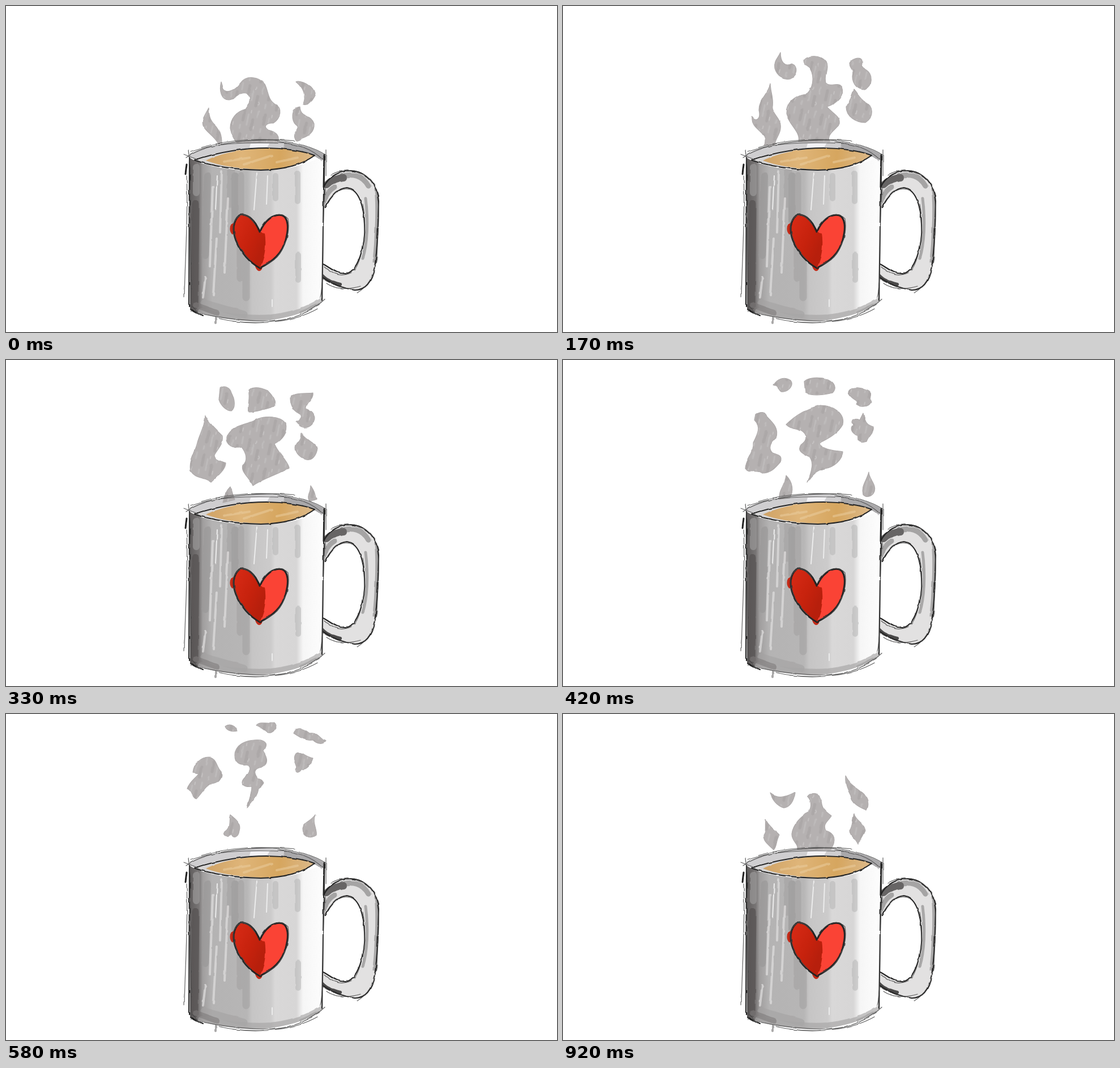
Write an HTML page without scripts that moves like this. It is 973x576 px and loops after 1 s.

```html
<!DOCTYPE html>
<html lang="en">
<head>
<meta charset="utf-8">
<title>Steaming mug</title>
<style>
html, body { margin: 0; width: 100%; height: 100%; overflow: hidden; background: #fff; }
svg { display: block; width: 100%; height: 100%; }
path { stroke-linecap: round; stroke-linejoin: round; }

/* Steam poses: each is shown for one slot of the loop */
.pose { opacity: 0; animation: slot 1s step-end infinite; animation-delay: calc((var(--t) - 1000) * 1ms); }
.pose.long { animation-name: slot-long; }
@keyframes slot { 0% { opacity: 1 } 7.99%, 100% { opacity: 0 } }
@keyframes slot-long { 0% { opacity: 1 } 8.99%, 100% { opacity: 0 } }
.puff path { transform-box: fill-box; transform-origin: center; transform: var(--shrink, none); }
.steam { fill: url(#brush); stroke: #aeaaaa; stroke-width: 1.2; }
.thin { --shrink: translateY(-10px) scale(.75); }
.fade { --shrink: translateY(-13px) scale(.5); }

.line { fill: none; stroke: #242424; stroke-width: 2.1; }
.bold { stroke-width: 3; }
.fine { fill: none; stroke: #484848; stroke-width: 1.2; opacity: .85; }
.stroke { fill: none; }
</style>
</head>
<body>
<svg viewBox="0 0 973 576" preserveAspectRatio="none">
<defs>
  <filter id="rough" x="-5%" y="-5%" width="110%" height="110%" color-interpolation-filters="sRGB">
    <feTurbulence type="fractalNoise" baseFrequency=".05" numOctaves="2" seed="4"/>
    <feDisplacementMap in="SourceGraphic" scale="3" xChannelSelector="R" yChannelSelector="G"/>
  </filter>
  <pattern id="brush" width="37" height="43" patternUnits="userSpaceOnUse" patternTransform="rotate(12)">
    <path fill="#b5b1b1" d="M0 0H37V43H0Z"/>
    <path class="stroke" stroke="#aca8a8" stroke-width="5" d="M7 6V24M24 20V38"/>
    <path class="stroke" stroke="#bebbbb" stroke-width="3" d="M15 12V31M31 3V14M4 33V39"/>
    <path class="stroke" stroke="#d4d2d2" stroke-width="1" d="M19 5V10M28 30V36"/>
  </pattern>
  <linearGradient id="body" gradientUnits="userSpaceOnUse" x1="324" x2="560" y1="0" y2="0">
    <stop stop-color="#605d5d"/><stop offset=".07" stop-color="#787575"/>
    <stop offset=".1" stop-color="#a09e9e"/><stop offset=".17" stop-color="#b4b3b3"/>
    <stop offset=".43" stop-color="#b7b6b6"/><stop offset=".47" stop-color="#c6c5c5"/>
    <stop offset=".61" stop-color="#cccbcb"/><stop offset=".64" stop-color="#d9d8d8"/>
    <stop offset=".8" stop-color="#d7d6d6"/><stop offset=".85" stop-color="#f6f6f6"/>
    <stop offset="1" stop-color="#fdfdfd"/>
  </linearGradient>
  <linearGradient id="coffee" gradientUnits="userSpaceOnUse" x1="350" x2="540" y1="265" y2="275">
    <stop stop-color="#cfa265"/><stop offset=".35" stop-color="#dfb579"/>
    <stop offset=".7" stop-color="#d6a65f"/><stop offset="1" stop-color="#dcb887"/>
  </linearGradient>
  <linearGradient id="red" gradientUnits="userSpaceOnUse" x1="400" x2="458" y1="390" y2="415">
    <stop stop-color="#d62a15"/><stop offset=".6" stop-color="#c6220d"/><stop offset="1" stop-color="#b71f0c"/>
  </linearGradient>
  <clipPath id="cup"><path d="M324 268C350 284 400 291 450 291C500 290 540 278 561 262L558 522C530 545 480 556 440 557C400 556 350 548 325 536Z"/></clipPath>

  <g id="curls" class="puff">
    <path d="M358 180C352 192 345 200 348 211C352 222 366 228 375 243L381 243C381 228 378 220 370 211C361 203 358 195 358 180Z"/>
    <path d="M380 134C376 150 380 166 394 166C408 164 412 151 424 154C437 160 431 172 424 182C406 186 396 200 396 216C398 226 402 236 408 242L478 242C486 232 478 222 463 219C452 212 462 206 472 207C486 198 488 180 476 174C462 166 464 152 457 138C446 124 424 122 414 136C406 148 392 156 384 147Z"/>
    <path d="M512 134C520 130 545 140 546 158C540 170 532 176 524 174C532 160 524 144 512 134Z"/>
    <path d="M519 178C502 180 504 204 512 210C522 212 506 222 510 232C512 240 518 240 522 234C534 230 545 222 544 208C538 190 520 198 519 178Z"/>
  </g>
  <g id="flames" class="puff">
    <path d="M366 138C362 156 346 164 346 184C350 200 340 206 334 196C332 212 346 218 352 226C360 234 356 242 356 246L374 246C374 234 386 226 384 210C384 198 368 190 370 176C372 162 366 150 366 138Z"/>
    <path d="M384 82C380 92 372 96 374 110C378 124 390 130 400 128C414 124 416 106 404 102C392 108 384 100 384 82Z"/>
    <path d="M424 96C432 86 456 86 464 98C470 110 460 122 464 136C472 144 484 134 492 142C498 156 486 172 466 178C476 190 490 194 488 208C482 220 466 224 470 240L416 240C420 222 400 212 394 190C394 170 410 158 430 156C440 146 446 128 436 110C430 104 424 104 424 96Z"/>
    <path d="M506 102C510 94 524 88 528 96C530 106 522 106 534 112C548 120 548 140 532 148C518 148 508 134 512 118C510 110 506 110 506 102Z"/>
    <path d="M514 148C520 154 524 164 534 170C548 176 550 196 534 206C518 206 500 196 500 178C508 170 508 160 514 148Z"/>
  </g>
  <g id="clouds" class="puff">
    <path d="M378 50C384 44 396 48 398 58C404 70 406 84 398 90C390 90 380 82 376 70Z"/>
    <path d="M428 54C436 46 448 48 462 54C470 62 480 76 474 82C460 86 442 92 428 92C426 78 432 66 428 54Z"/>
    <path d="M502 68C506 56 530 60 542 58C544 70 528 76 530 86C544 90 550 102 540 114C530 124 518 118 512 110C522 104 526 98 514 92C506 86 502 78 502 68Z"/>
    <path d="M512 150C520 144 522 136 522 128C526 140 544 144 550 156C548 170 540 178 530 176C518 172 508 162 512 150Z"/>
    <path d="M352 98C350 120 342 130 338 146C334 164 322 178 326 196C334 210 350 206 362 216C372 206 388 194 388 182C380 178 368 178 368 168C374 156 384 150 382 134C372 124 360 114 352 98Z"/>
    <path d="M390 136C396 116 420 116 440 106C456 98 484 98 494 112C498 128 486 142 474 148C480 164 496 176 500 190C482 202 456 208 436 222C430 208 414 198 418 186C428 178 424 164 416 154C404 158 388 150 390 136Z"/>
  </g>
  <g id="nubs" class="puff">
    <path d="M396 224C386 234 386 242 383 252L404 247C400 238 400 232 396 224Z"/>
    <path d="M538 222C538 234 530 240 536 250L548 246C544 236 548 236 538 222Z"/>
  </g>
  <g id="islands" class="puff">
    <path d="M372 44C378 34 390 28 402 36C408 44 400 54 390 56C380 58 384 48 372 44Z"/>
    <path d="M426 38C434 30 452 30 468 34C480 40 484 50 476 58C460 62 440 64 428 58Z"/>
    <path d="M504 58C504 48 520 48 538 54C550 60 538 66 544 74C540 84 526 84 518 78C524 70 510 72 504 58Z"/>
    <path d="M530 94C534 108 534 114 548 118C550 128 540 132 536 144C524 148 518 142 522 134C510 130 506 122 512 116C506 106 516 102 524 106Z"/>
    <path d="M340 96C348 90 358 92 360 100C372 112 382 122 376 138C366 146 362 156 370 164C380 168 388 168 384 180C374 192 366 200 352 200C340 192 330 202 322 192C322 176 338 164 336 146C344 130 350 118 338 106Z"/>
    <path d="M394 114C410 98 430 86 454 80C480 80 498 96 494 114C486 130 466 140 454 146C456 158 476 160 494 162C494 176 478 190 462 192C446 196 438 206 432 216C438 198 444 184 436 172C420 164 414 160 420 150C434 140 430 130 420 124C410 122 402 122 394 114Z"/>
    <path d="M394 204C406 216 408 232 400 244L382 246C380 230 392 222 394 204Z"/>
    <path d="M540 198C540 210 554 220 550 232C546 242 536 244 530 238C526 222 536 214 540 198Z"/>
  </g>
  <g id="shreds" class="puff">
    <path d="M387 22C394 16 406 20 408 30C400 32 390 30 387 22Z"/>
    <path d="M442 20C448 12 464 18 474 16C480 20 476 28 468 32C458 34 454 24 442 20Z"/>
    <path d="M508 34C512 22 524 24 536 34C552 32 552 42 564 48C560 54 550 54 542 46C530 48 520 42 508 34Z"/>
    <path d="M512 70C522 64 528 76 542 78C538 90 532 98 522 98C516 106 508 104 514 94C512 86 506 78 512 70Z"/>
    <path d="M330 104C332 88 344 76 358 76C374 80 370 92 380 102C384 114 374 124 360 124C350 130 346 140 336 150C328 148 330 136 320 132C324 120 332 116 340 106Z"/>
    <path d="M404 74C404 54 424 44 450 46C464 50 460 58 454 66C462 78 464 88 452 94C436 96 438 106 444 114C460 116 456 126 446 132C444 146 436 152 426 166C428 152 434 144 434 128C422 130 410 124 422 112C428 102 434 96 426 90C412 92 404 86 404 74Z"/>
    <path d="M396 178C406 186 416 194 412 206C410 220 400 220 398 212C394 218 380 216 386 208C398 200 392 190 396 178Z"/>
    <path d="M546 178C540 192 550 204 548 214C536 222 524 216 524 202C526 190 538 190 546 178Z"/>
  </g>
  <g id="wisps" class="puff">
    <path d="M435 18L437 18 438 36C448 44 442 52 440 54C450 62 446 80 440 92C438 104 436 108 430 108C424 96 438 84 438 68C436 54 428 54 424 48C432 42 434 34 435 18Z"/>
    <path d="M346 70C352 64 360 56 370 58C374 66 364 72 360 80C350 84 344 80 346 70Z"/>
    <path d="M516 44L523 42C522 52 532 58 530 66C530 72 526 76 524 80C524 68 518 56 516 44Z"/>
  </g>
  <g id="buds" class="puff">
    <path d="M382 182C390 176 390 168 400 164C412 164 408 172 408 180C414 190 404 196 396 194C388 194 386 188 382 182Z"/>
    <path d="M514 146C524 152 526 152 530 142C538 150 540 158 538 168C536 176 540 186 534 192C526 184 526 178 532 168C534 160 524 154 514 146Z"/>
    <path d="M366 222C376 228 380 236 378 250L366 258C364 246 368 236 366 222Z"/>
    <path d="M408 222C416 220 422 212 428 208C438 222 452 228 464 230C462 242 462 246 456 251L414 253C416 240 410 232 408 222Z"/>
    <path d="M520 218C522 230 526 238 524 248L506 250C508 236 516 234 520 218Z"/>
  </g>
  <g id="loose" class="puff">
    <path d="M366 140C378 150 392 148 410 138C408 152 402 164 390 166C378 162 370 152 366 140Z"/>
    <path d="M499 110C506 126 520 130 532 142C540 152 540 162 536 170C522 164 510 158 508 144C502 132 498 124 499 110Z"/>
  </g>
  <g id="rising" class="puff">
    <path d="M358 186C362 198 374 204 382 214C376 224 378 234 372 240C362 230 354 226 354 214C360 206 356 198 358 186Z"/>
    <path d="M432 146C440 138 452 138 456 150C456 168 464 172 474 180C468 190 458 194 464 206C480 210 484 224 472 240L414 240C416 228 404 226 404 212C406 196 420 180 434 174C440 162 438 152 432 146Z"/>
    <path d="M514 176C516 188 532 192 534 206C530 216 526 222 520 230C516 220 506 214 506 206C512 198 510 190 514 176Z"/>
  </g>
</defs>

<!-- Handle -->
<g filter="url(#rough)">
  <path fill="#e2e1e1" fill-rule="evenodd" d="M560 318C572 298 590 290 612 291C640 292 658 316 658 345L653 440C650 478 640 502 618 502C596 500 576 494 558 483L560 457C574 464 586 474 600 473C620 470 632 440 634 405C634 370 630 322 602 321C584 322 570 338 563 356Z"/>
  <path class="stroke" stroke="#a5a4a4" stroke-width="9" d="M559 354C562 338 570 326 580 320M592 301C612 295 630 300 640 318"/>
  <path class="stroke" stroke="#676565" stroke-width="12" d="M566 316C574 308 584 304 596 303"/>
  <path class="stroke" stroke="#a9a8a8" stroke-width="5" d="M653 325C657 360 653 420 650 452M635 340C640 380 638 420 630 446"/>
  <path class="stroke" stroke="#4a4949" stroke-width="6" d="M559 477C566 485 576 488 590 492"/>
  <path class="line" d="M561 320C570 300 590 291 610 291C636 292 657 318 658 345C657 390 656 430 651 462C646 488 634 502 616 502C592 498 574 490 560 480M564 356C574 334 588 322 602 321C622 324 631 350 633 385C636 425 620 470 600 473C584 474 572 462 560 456"/>
  <path class="fine" d="M574 298C600 284 626 292 645 310M650 316C664 350 656 400 655 445C650 480 638 496 620 507M568 346C580 328 596 318 612 326M630 350C638 390 632 440 616 466M562 461C576 474 592 480 610 471M566 490C580 500 604 502 626 495"/>
</g>

<!-- Cup -->
<g clip-path="url(#cup)">
  <path fill="url(#body)" d="M320 250H565V560H320Z"/>
  <g filter="url(#rough)" class="stroke">
    <path stroke="#575353" stroke-width="13" opacity=".75" d="M335 350L333 530"/>
    <path stroke="#9b9999" stroke-width="12" opacity=".7" d="M336 284V330M356 300L352 440M404 300V380"/>
    <path stroke="#a4a2a2" stroke-width="13" opacity=".6" d="M398 292L396 350M414 300V480M424 440V515M350 525L420 545"/>
    <path stroke="#dedddd" stroke-width="4" opacity=".75" d="M381 292L378 400M365 320L360 460M392 340L386 470M352 480L348 515M372 410L366 510"/>
    <path stroke="#ececec" stroke-width="2" d="M443 295L438 360M462 300L460 350M470 520V532M373 300L370 360"/>
    <path stroke="#bab9b9" stroke-width="10" opacity=".6" d="M476 300V340M515 296V345M516 440V485"/>
    <path stroke="#a6a5a5" stroke-width="12" opacity=".65" d="M345 540C400 552 440 553 470 551C510 545 530 538 556 522"/>
    <path stroke="#7d7b7b" stroke-width="10" opacity=".6" d="M334 528L372 542"/>
  </g>
</g>

<!-- Rim and coffee -->
<g filter="url(#rough)">
  <path fill="#cfced0" d="M320 266C340 247 400 238 450 237C500 238 545 248 564 264L556 274 545 263C500 252 440 250 400 256C370 260 345 266 333 271Z"/>
  <path fill="#a9a8aa" d="M492 240C530 246 552 256 564 264L558 274C540 260 520 254 490 252Z"/>
  <path fill="#f3f2f5" d="M432 243L466 241 462 249 430 250Z"/>
  <path fill="#d6d5d5" d="M333 272C370 260 410 251 460 251C490 251 525 256 545 264C520 282 490 289 450 290C400 289 360 282 333 272Z"/>
  <path fill="url(#coffee)" d="M353 273C380 260 420 252 460 251C490 251 525 256 545 264C520 281 490 288 450 289C410 287 380 283 353 273Z"/>
  <path class="stroke" stroke="#ecd0a2" stroke-width="4" opacity=".5" d="M385 275L430 268M420 280L470 264M478 276L515 268"/>
  <path class="stroke" stroke="#aaa9a9" stroke-width="4" d="M370 548V560M520 541L552 527"/>
</g>

<!-- Steam -->
<g class="steam" filter="url(#rough)">
  <g class="pose" style="--t:0"><use href="#curls"/></g>
  <g class="pose long" style="--t:80"><use href="#flames" transform="translate(0 29) scale(1 .88)"/></g>
  <g class="pose" style="--t:170"><use href="#flames"/></g>
  <g class="pose" style="--t:250"><use href="#clouds" transform="translate(0 20)"/></g>
  <g class="pose long" style="--t:330"><use href="#clouds"/><use href="#nubs"/></g>
  <g class="pose" style="--t:420"><use href="#islands"/></g>
  <g class="pose" style="--t:500"><use href="#shreds" transform="translate(-20 10) scale(1.05)"/></g>
  <g class="pose long" style="--t:580"><use href="#shreds"/></g>
  <g class="pose" style="--t:670"><use href="#shreds" class="thin"/></g>
  <g class="pose" style="--t:750"><use href="#wisps"/><use href="#buds"/></g>
  <g class="pose long" style="--t:830"><use href="#wisps" class="fade"/><use href="#loose" transform="translate(2 12)"/><use href="#rising" transform="translate(0 80) scale(1 .67)"/></g>
  <g class="pose" style="--t:920"><use href="#loose"/><use href="#rising"/></g>
</g>

<!-- Pencil lines -->
<g filter="url(#rough)">
  <path class="line" d="M333 272C370 260 410 251 460 251C490 251 525 256 545 264C520 282 490 289 450 290C400 289 360 282 333 272M324 268L323 530M562 262L558 520M325 536L348 548"/>
  <path class="line bold" d="M319 280L317 297M562 264L561 320M327 537L336 542"/>
  <path class="fine" d="M318 268C350 244 420 236 470 237C510 239 545 250 566 264M326 258C370 241 430 240 500 243M345 250C400 234 450 234 510 238M480 240C520 246 540 252 560 272M314 262L340 272M322 255L326 290M565 254V300M319 300C322 370 316 450 315 514M326 290C322 380 329 460 326 540M564 320C556 400 564 470 555 515"/>
  <path class="fine" d="M328 530L342 546M335 542C380 552 420 557 470 557C510 553 540 540 563 518M400 557C450 564 510 558 550 535M375 552C400 558 430 560 455 559"/>
</g>

<!-- Heart -->
<g filter="url(#rough)">
  <path fill="#c42a17" d="M404 382C394 386 393 398 400 404L410 390ZM440 460C444 472 452 470 453 460Z"/>
  <path fill="#fa4335" d="M448 400C456 378 474 366 490 370C502 382 497 410 488 428C478 444 462 456 448 463Z"/>
  <path fill="url(#red)" d="M448 400C440 376 424 366 412 370C400 380 400 398 406 414C416 438 432 454 448 463C458 444 460 420 457 402Z"/>
  <path class="line bold" d="M448 400C440 376 424 366 412 370C400 380 400 398 406 414C416 438 432 454 448 463C470 452 488 438 494 412C500 392 498 374 488 370C472 366 456 380 448 400"/>
  <path class="fine" d="M440 386C426 364 410 366 403 382C398 402 412 432 432 450M452 390C464 368 486 362 498 376C502 400 494 428 474 448M406 376C414 364 430 368 438 380M454 458C474 452 488 438 492 418"/>
</g>
</svg>
</body>
</html>
```
